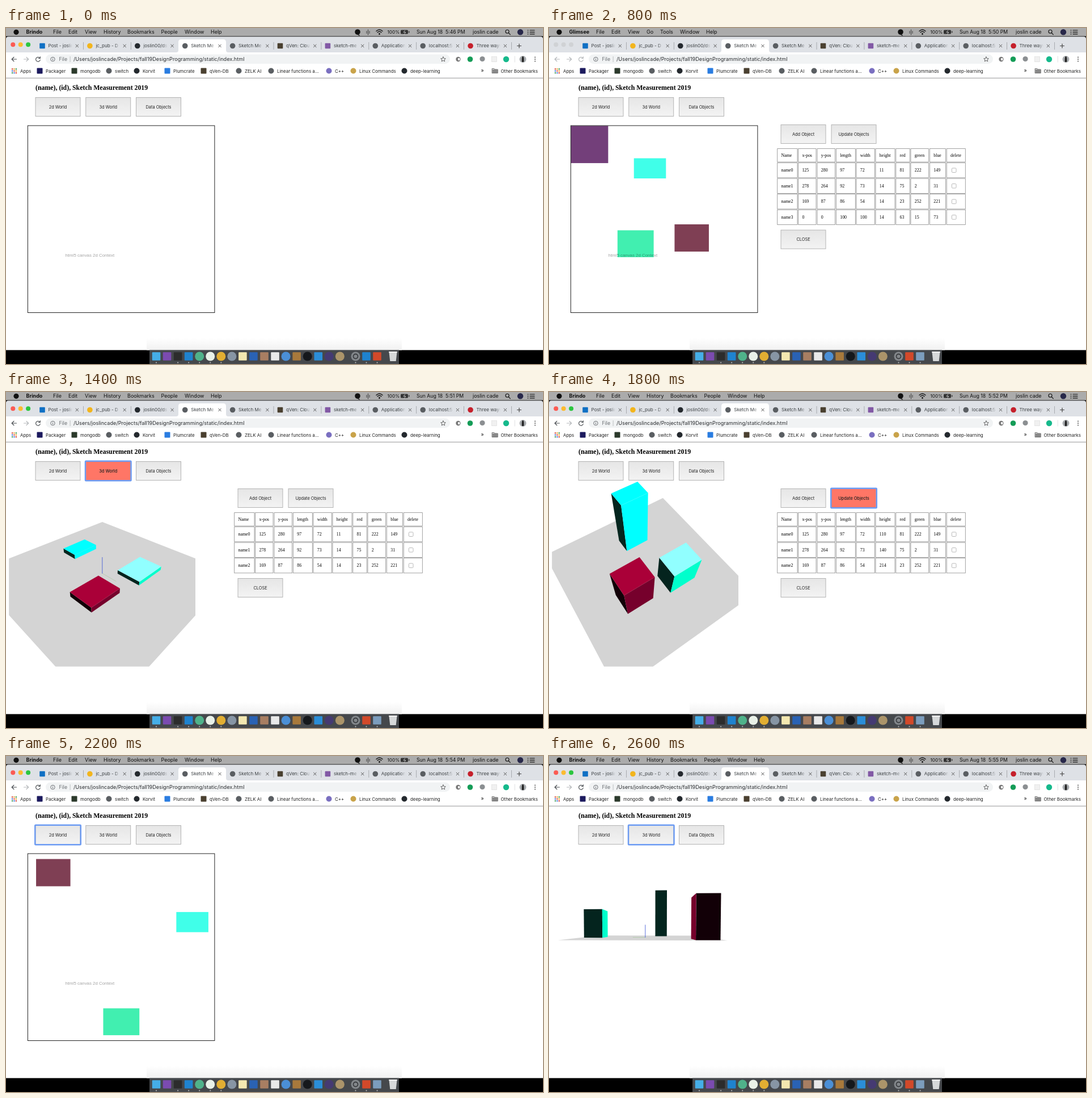
An HTML page that plays this animation: 947 px wide and 592 px high, repeating every 2800 ms.

```html
<!DOCTYPE html>
<html lang="en">
<head>
<meta charset="utf-8">
<title>Object editor</title>
<style>
  html, body { margin: 0; width: 100%; height: 100%; overflow: hidden; background: #000; }
  svg { display: block; }
  text { font-family: Inter, Roboto, sans-serif; white-space: pre; }
  .serif { font-family: "Liberation Serif", "Times New Roman", serif; }
  .arial { font-family: "Liberation Sans", Arial, sans-serif; }
</style>
</head>
<body>
<svg id="stage" width="947" height="592" viewBox="0 0 947 592" xmlns="http://www.w3.org/2000/svg">
  <defs>
    <linearGradient id="btn" x2="0" y2="1"><stop stop-color="#e6e6e6"/><stop offset="1" stop-color="#f3f3f3"/></linearGradient>
    <linearGradient id="fade"><stop stop-color="#dee1e6" stop-opacity="0"/><stop offset="1" stop-color="#dee1e6"/></linearGradient>
    <linearGradient id="fadeOn"><stop stop-color="#fff" stop-opacity="0"/><stop offset="1" stop-color="#fff"/></linearGradient>
    <linearGradient id="glow" x2="0" y2="1"><stop stop-color="#fff"/><stop offset="1" stop-color="#f1f1f1"/></linearGradient>
    <clipPath id="view"><rect x="5.2" y="155" width="328.8" height="328.8"/></clipPath>
  </defs>
  <g id="base"></g>
  <g id="live"></g>
</svg>
<script>
const STEP = 200;
const U = 947 / 1440; // screen scale

// ---- drawing helpers
const rect = (x, y, w, h, fill, extra = '') =>
  `<rect x="${x}" y="${y}" width="${w}" height="${h}" fill="${fill}" ${extra}/>`;
const dot = (x, y, r, fill, extra = '') => `<circle cx="${x}" cy="${y}" r="${r}" fill="${fill}" ${extra}/>`;
const text = (x, y, s, size = 8, fill = '#222', extra = '') =>
  `<text x="${x}" y="${y}" font-size="${size}" fill="${fill}" ${extra}>${s}</text>`;
const line = (d, color = '#555', w = 1) =>
  `<path d="${d}" fill="none" stroke="${color}" stroke-width="${w}" stroke-linecap="round" stroke-linejoin="round"/>`;
const icon = (x, y, [kind, color], r = 5) =>
  kind === 'o' ? dot(x, y, r, color) : rect(x - r, y - r, 2 * r, 2 * r, color, 'rx="1"');
const cross = (x, y, r = 2.3) => line(`M${x - r} ${y - r}l${2 * r} ${2 * r}m0 ${-2 * r}l${-2 * r} ${2 * r}`);

const GLOBE = ['o', '#5a5e62'], BLACK = ['o', '#24292e'], DEN = ['s', '#4a4030'];

// ---- browser window
const TABS = [
  ['Post - joslin', ['s', '#1070c4']], ['jc_pub - D', ['o', '#f2b51d']], ['joslin00/ds', BLACK],
  ['Sketch Me', GLOBE], ['Sketch Me', GLOBE], ['qVen: Clou', DEN], ['sketch-me', ['s', '#8259a5']],
  ['Application', GLOBE], ['localhost:5', GLOBE], ['Three ways', ['o', '#c5202b']]
];
const MARKS = [
  [59, 'Packager', ['s', '#1c1a5e']], [120, 'mongodb', ['s', '#2c3a2c']], [181, 'switch', GLOBE],
  [230, 'Korvit', BLACK], [284, 'Plumcrate', ['s', '#2a7de1']], [348, 'qVen-DB', DEN],
  [410, 'ZELK AI', GLOBE], [467, 'Linear functions a...', GLOBE], [569, 'C++', ['o', '#7a6fc0']],
  [612, 'Linux Commands', ['o', '#c9a34a']], [702, 'deep-learning', BLACK]
];

function tab([label, mark], i) {
  const x = 64 + 83.9 * i, on = i === 3;
  let s = on ? `<path d="M300 43q4 0 4-4V25q0-5 5-5h74q5 0 5 5v14q0 4 4 4z" fill="#fff"/>` : '';
  s += icon(x, 31.5, mark, 4.8);
  s += `<svg x="${x + 10.5}" y="20" width="42" height="22">${text(0, 14.2, label, 8.1, '#3c4043')}</svg>`;
  s += rect(x + 44, 23, 9, 16, `url(#${on ? 'fadeOn' : 'fade'})`);
  s += cross(x + 61.3, 31.5);
  if (i !== 2 && i !== 3) s += rect(x + 72, 25, 0.8, 13, '#9a9da1');
  return s;
}

function menuBar() {
  let s = rect(0, 0, 947, 22 * U, '#ababab') + dot(18, 7.3, 4.6, '#111');
  s += dot(620, 7, 4.8, '#111') + line('M620 11l3 2', '#111', 1.5);
  s += line('M638.5 3v9M636 5.5v4M641 5.5v4', '#333', 0.9);
  s += line('M653 5.5q5.5-5 11 0M655 7.8q3.5-3.2 7 0', '#111', 1.3) + dot(658.5, 10.5, 1.4, '#111');
  s += text(672.5, 10.2, '100%', 8.2, '#111');
  s += rect(696, 3.5, 13, 7, '#333', 'rx="1.5"') + rect(710, 5.5, 1.4, 3, '#333');
  s += line('M703.5 4.5l-2.5 3h4l-2.5 3', '#ddd', 0.8);
  s += text(823, 10.3, 'joslin cade', 9, '#111');
  s += dot(884, 6.3, 3, 'none', 'stroke="#111" stroke-width="1.1"') + line('M886.3 8.7l3 3', '#111', 1.2);
  s += dot(907, 7.3, 5.2, '#28284a');
  return s + line('M920 4h1m3 0h8M920 7.3h1m3 0h8M920 10.6h1m3 0h8', '#111', 1.2);
}

function toolbar() {
  let s = rect(0, 43, 947, 45, '#fff') + rect(0, 87.5, 947, 1, '#c3c5c8');
  s += rect(70, 46.5, 713, 16.5, '#f1f3f4', 'rx="8.2"');
  s += line('M39.5 55h-8m4.5-3.5l3.7 3.5l-3.7 3.5', '#b5b8bb', 1.2);
  s += dot(82.5, 55, 3.7, 'none', 'stroke="#5f6368" stroke-width="0.9"') + line('M82.5 54.7v2M82.5 53v.1', '#5f6368', 0.9);
  s += text(93.5, 58, 'File', 8.8, '#6a6e72') + rect(112.7, 50, 0.8, 10, '#b0b3b6');
  s += text(119, 58, '/Users/joslincade/Projects/fall19DesignProgramming/static/index.html', 9.15, '#2b2e31');
  s += line('M771 50.8l1.3 2.8 3 .3-2.2 2 .6 3-2.7-1.6-2.7 1.6.6-3-2.2-2 3-.3z', '#555', 0.9);
  s += dot(797.5, 55, 4.2, '#777') + rect(797, 53, 3.5, 4, '#f5f5f5');
  s += dot(818.5, 55, 4.8, '#149c57') + dot(840, 54.5, 4.6, '#8b8f92');
  s += rect(856.5, 50.5, 9, 9, '#f0f0f0', 'stroke="#ddd" stroke-width="0.7"') + dot(882, 55, 5.2, '#16b98c');
  s += rect(896.8, 49.5, 0.7, 11, '#d0d2d4') + dot(911.5, 55, 6, '#a9adb0');
  s += rect(909.7, 52, 3.6, 8, '#222', 'rx="1.5"') + dot(911.5, 51.5, 1.5, '#222');
  for (const y of [51.5, 55, 58.5]) s += dot(933, y, 1, '#555');

  const hues = ['#d9453a', '#e8a52c', '#3d9a56', '#3f74d8'];
  for (let i = 0; i < 9; i++) s += rect(10 + i % 3 * 3.4, 71.2 + (i / 3 | 0) * 3.4, 2.2, 2.2, hues[i % 4]);
  s += text(25, 78.5, 'Apps', 7.9);
  for (const [x, label, mark] of MARKS) s += icon(x + 0.5, 75.5, mark) + text(x + 11, 78.5, label, 7.9);
  s += text(837.5, 78, '»', 9) + line('M857.5 71.5h3.5l1.2 1.5h5v6.5h-9.7z', '#666') + rect(857.5, 73, 9.7, 6.5, '#888');
  return s + text(872.5, 78.5, 'Other Bookmarks', 7.95);
}

const DOCK = [
  ['s', '#45aee8'], ['s', '#7b4bb0'], ['s', '#2c2c2c'], ['s', '#1f83cf'], ['o', '#4fb28a'], ['o', '#e9f1e8'],
  ['o', '#e2ae32'], ['o', '#8795a4'], ['s', '#f3e7b0'], ['s', '#2a62b4'], ['s', '#a87e62'], ['s', '#e9e9e9'],
  ['o', '#4b8fd6'], ['s', '#a8793c'], ['o', '#15181c'], ['s', '#2b8ed8'], ['o', '#453a72'], ['o', '#ab946a']
];

function dock() {
  let s = rect(253, 567.5, 440, 24.5, '#45484c');
  DOCK.forEach((mark, i) => s += icon(265 + 19.05 * i, 578.5, mark, mark[0] === 'o' ? 8 : 7.3));
  s += dot(616.5, 578.5, 8, '#83878b') + dot(616.5, 578.5, 4, 'none', 'stroke="#3a3d40" stroke-width="1.8"');
  s += `<path d="M675.5 571h14l-1.8 16h-10.4z" fill="#d6d8d9"/>` + rect(675, 570, 15, 2, '#f0f0f0', 'rx="1"');
  for (const i of [0, 2, 3, 4, 5, 6, 18.45, 19.45, 20.45]) s += dot(265 + 19.05 * i, 589.5, 1, '#c9c9c9');
  return s;
}

// ---- page parts
function button(x, y, label, focus, hot) {
  let s = rect(x, y, 79, 33, hot ? '#ff7666' : 'url(#btn)', 'stroke="#adadad" stroke-width="0.9"');
  if (focus) s += rect(x - 0.8, y - 0.8, 80.6, 34.6, 'none', 'rx="1" stroke="#6c9bf3" stroke-width="2.4"');
  return s + text(x + 39.5, y + 19.1, label, 7.4, '#222', 'text-anchor="middle"' + (hot ? ' font-weight="500"' : ''));
}

const COLS = [
  ['Name', 402.7, 438], ['x-pos', 439.6, 471], ['y-pos', 473, 504.6], ['length', 506.4, 540.3], ['width', 542, 574.3],
  ['height', 576, 610], ['red', 611.8, 636.3], ['green', 638, 669.6], ['blue', 671.5, 699.6], ['delete', 701.3, 734.3]
];

function panel(objs, focus) {
  let s = button(409, 170.5, 'Add Object') + button(498, 170.5, 'Update Objects', focus, focus);
  const cell = (c, y, h, label) =>
    rect(c[1], y, c[2] - c[1], h, '#fff', 'stroke="#8a8a8a" stroke-width="0.8"') +
    text(c[1] + 6.8, y + h / 2 + 2.6, label, 12 * U, '#000', 'class="serif"');
  for (const c of COLS) s += cell(c, 212.6, 23.4, c[0]);
  objs.forEach((o, i) => {
    const y = 237.6 + 27.55 * i, vals = ['name' + i, ...o.tab, ''];
    COLS.forEach((c, k) => s += cell(c, y, 26.2, vals[k]));
    s += rect(710.4, y + 9.3, 7.6, 7.6, '#fff', 'rx="1.4" stroke="#a8a8a8" stroke-width="0.8"');
  });
  return s + button(409, 246 + 27.5 * objs.length, 'CLOSE');
}

// ---- scene: each object has x, y, length, width, height
const LOOK = [
  { flat: '#41efb0', top: '#91ffff', ySide: '#00ffcc', xSide: '#04241e' },
  { flat: '#7f3f54', top: '#aa0038', ySide: '#76002c', xSide: '#120007' },
  { flat: '#40ffe9', top: '#00ffff', ySide: '#00ffff', xSide: '#04261f' },
  { flat: '#733f7a', top: '#8c00a8', ySide: '#620078', xSide: '#0b000d' }
];
const RGB = [[81, 222, 149], [75, 2, 31], [23, 252, 221], [63, 15, 73]];
const make = list => list.map((b, i) => ({ b, look: LOOK[i], tab: [...b, ...RGB[i]] }));

const FIRST = make([[125, 280, 97, 72, 11], [278, 264, 92, 73, 14], [169, 87, 86, 54, 14], [321, 127, 53, 98, 14]]);
const SQUARE = [...FIRST.slice(0, 3), { b: [0, 0, 100, 100, 14], look: LOOK[3], tab: [0, 0, 100, 100, 14, ...RGB[3]] }];
const THREE = FIRST.slice(0, 3);
const TALL = make([[125, 280, 97, 72, 110], [278, 264, 92, 73, 140], [169, 87, 86, 54, 214]]);
const MOVED = make([[202, 414, 97, 72, 110], [22, 14, 92, 73, 140], [398, 156, 86, 54, 214]]);

function flatView(objs) {
  const frame = (fill, extra) => rect(38.4, 172, 501 * U, 501 * U, fill, extra);
  let s = frame('#fff');
  for (const { b, look } of objs) s += rect(38.6 + b[0] * U, 172.3 + b[1] * U, b[2] * U, b[3] * U, look.flat);
  s += frame('none', 'stroke="#222" stroke-width="1"');
  return s + text(104.5, 402.6, 'html5 canvas 2d Context', 12 * U, '#000', 'class="arial" fill-opacity="0.36"');
}

// orbit camera around the origin: distance, azimuth, elevation in degrees
function orbitView(objs, [dist, azim, elev]) {
  const a = azim * Math.PI / 180, e = elev * Math.PI / 180;
  const ca = Math.cos(a), sa = Math.sin(a), ce = Math.cos(e), se = Math.sin(e);
  const eye = [dist * ce * ca, dist * ce * sa, dist * se];
  const pt = (x, y, z) => {
    const u = y * ca - x * sa, v = x * ca + y * sa, k = 397 / (dist - v * ce - z * se);
    return (169.8 + u * k).toFixed(2) + ',' + (319.5 + (v * se - z * ce) * k).toFixed(2);
  };
  const poly = (fill, ...ps) => `<polygon points="${ps.map(p => pt(...p)).join(' ')}" fill="${fill}"/>`;
  const H = 250;

  let s = poly('#d4d4d4', [-H, -H, 0], [H, -H, 0], [H, H, 0], [-H, H, 0]);
  s += line(`M${pt(0, 0, 0)}L${pt(0, 50, 0)}`, '#a9cba2', 0.7);
  s += line(`M${pt(0, 0, 0)}L${pt(0, 0, 50)}`, '#4a63d8', 0.9);

  const near = ({ b }) => (b[0] + b[2] / 2 - H) * ca + (b[1] + b[3] / 2 - H) * sa;
  for (const { b, look } of [...objs].sort((p, q) => near(p) - near(q))) {
    const x0 = b[0] - H, y0 = b[1] - H, x1 = x0 + b[2], y1 = y0 + b[3], h = b[4];
    const xs = eye[0] > x1 ? x1 : eye[0] < x0 ? x0 : null;
    const ys = eye[1] > y1 ? y1 : eye[1] < y0 ? y0 : null;
    if (xs !== null) s += poly(look.xSide, [xs, y0, 0], [xs, y1, 0], [xs, y1, h], [xs, y0, h]);
    if (ys !== null) s += poly(look.ySide, [x0, ys, 0], [x1, ys, 0], [x1, ys, h], [x0, ys, h]);
    if (eye[2] > h) s += poly(look.top, [x0, y0, h], [x1, y0, h], [x1, y1, h], [x0, y1, h]);
  }
  return `<g clip-path="url(#view)">${s}</g>`;
}

// ---- timeline, one entry per step
const HOME = [606.2, 45, 35.26], HIGH = [743, 56.6, 61.3], WIDE = [915, 120, 30], LOW = [912, 182.7, 2.05];
const STEPS = [
  { min: 46, objs: [] },
  { min: 47, objs: [], rows: FIRST, focus: 2 },
  { min: 48, objs: FIRST, rows: FIRST, focus: 0 },
  { min: 49, objs: FIRST, rows: FIRST, focus: 1, cam: HOME },
  { min: 50, objs: SQUARE, rows: SQUARE, away: true },
  { min: 50, objs: SQUARE, rows: SQUARE, focus: 1, cam: HOME },
  { min: 51, objs: THREE, rows: THREE, focus: 0 },
  { min: 51, objs: THREE, rows: THREE, focus: 1, hot: true, cam: HOME },
  { min: 52, objs: THREE, rows: THREE, focus: 1, cam: HIGH },
  { min: 52, objs: TALL, rows: TALL, focus: 3, cam: HIGH },
  { min: 53, objs: TALL, cam: HIGH },
  { min: 54, objs: MOVED, focus: 0 },
  { min: 55, objs: MOVED, focus: 1, cam: WIDE },
  { min: 55, objs: MOVED, focus: 1, cam: LOW }
];
const MENUS = [
  ['Brindo', 'File', 83, 'Edit', 110, 'View', 139, 'History', 172, 'Bookmarks', 214, 'People', 273.5, 'Window', 315, 'Help', 361],
  ['Glimsee', 'File', 83, 'Edit', 110, 'View', 139, 'Go', 172, 'Tools', 196, 'Window', 231, 'Help', 277]
];

function render(i) {
  const { min, objs, rows, focus, hot, cam, away } = STEPS[i];
  const menu = MENUS[away ? 1 : 0];
  let s = text(35.5, 10.3, menu[0], 9, '#111', 'font-weight="700"');
  for (let k = 1; k < menu.length; k += 2) s += text(menu[k + 1], 10.3, menu[k], 9, '#111');
  s += text(724, 10.3, `Sun Aug 18  5:${min} PM`, 8.7, '#111');

  const lights = away ? ['#d0d2d5', '#d0d2d5', '#d0d2d5'] : ['#fb5b53', '#fcbb2f', '#2cc63f'];
  lights.forEach((c, k) => s += dot(12.3 + 13.4 * k, 29.2, 4, c));
  const ink = away ? '#b5b8bb' : '#4d5155';
  s += line('M10 55h8.5m-4.5-3.7l-3.8 3.7l3.8 3.7', ink, 1.2);
  s += line('M59.5 52.8a3.9 3.9 0 1 0 .8 3.2M60.3 50.5v3h-3', ink, 1.2);

  ['2d World', '3d World', 'Data Objects'].forEach((label, k) =>
    s += button(52 + 88.75 * k, 122.5, label, focus === k, hot && focus === k));
  s += cam ? orbitView(objs, cam) : flatView(objs);
  if (rows) s += panel(rows, focus === 3);

  const apps = i ? [['s', '#d2492a'], ['s', '#7c9dbd']] : [['s', '#1f83cf'], ['s', '#d2492a']];
  apps.forEach((mark, k) => s += icon(635.5 + 19 * k, 578.5, mark, 7.3));
  document.getElementById('live').innerHTML = s;
}

document.getElementById('base').innerHTML =
  rect(0, 0, 947, 592, '#000') + menuBar() +
  rect(0, 23 * U, 947, 40, '#dee1e6', 'rx="4"') + TABS.map(tab).join('') +
  line('M901.5 31.5h7m-3.5-3.5v7', '#444', 1.2) + toolbar() +
  rect(0, 88.5, 947, 479, '#fff') + rect(248, 546, 450, 21.5, 'url(#glow)') +
  text(52, 108.8, '(name), (id), Sketch Measurement 2019', 18 * U, '#000', 'class="serif" font-weight="700"') +
  dock();

let shown = -1;
const start = performance.now();
function tick() {
  const i = Math.floor((performance.now() - start) / STEP) % STEPS.length;
  if (i !== shown) render(shown = i);
  requestAnimationFrame(tick);
}
tick();
</script>
</body>
</html>
```
